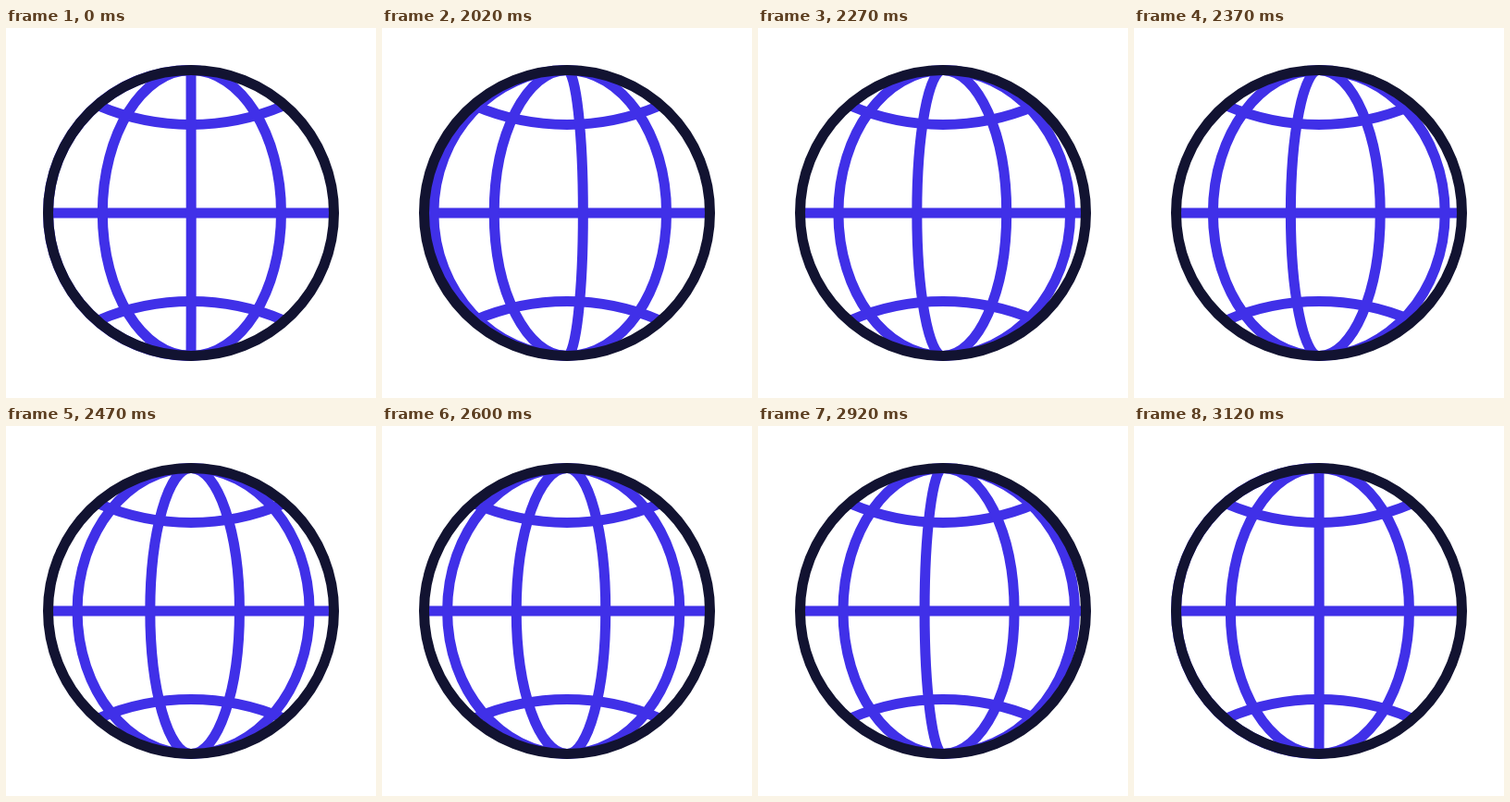
Recreate the animation shown at these times as an HTML page. Size 400x400 px, loop 3.2 s.

```html
<!DOCTYPE html>
<html lang="en">
<head>
<meta charset="utf-8">
<title>Spinning globe</title>
<style>
  html, body { margin: 0; width: 100%; height: 100%; overflow: hidden; background: #fff; }
  svg { display: block; width: 100%; height: 100%; }
</style>
</head>
<body>
<svg viewBox="0 0 400 400" fill="none" stroke-width="11">
  <g stroke="#4030e8">
    <path d="M46 200H354"/>
    <path d="M100 84A255 255 0 0 0 300 84"/>
    <path d="M100 316A255 255 0 0 1 300 316"/>
    <g id="meridians"></g>
  </g>
  <circle cx="200" cy="200" r="154.5" stroke="#121331"/>
</svg>
<script>
  const LOOP = 3200, START = 2000, SPIN = 1120, TURNS = 7;
  const STOPS = [-154.5, -95.7, 0.2, 97.5, 154.5];
  const C = 200, R = 154.5, K = 0.5523;

  const group = document.getElementById('meridians');
  const lines = STOPS.slice(1).map(() =>
    group.appendChild(document.createElementNS('http://www.w3.org/2000/svg', 'path')));

  const bezier = (a, b, u) => 3 * (1 - u) ** 2 * u * a + 3 * (1 - u) * u * u * b + u ** 3;

  // cubic-bezier(.167, .167, .461, 1)
  function ease(x) {
    if (x <= 0 || x >= 1) return x <= 0 ? 0 : 1;
    let lo = 0, hi = 1;
    for (let i = 0; i < 30; i++) {
      const mid = (lo + hi) / 2;
      if (bezier(0.167, 0.461, mid) < x) lo = mid; else hi = mid;
    }
    return bezier(0.167, 1, lo);
  }

  // Half ellipse from pole to pole, bulging sideways by w
  const meridian = w =>
    `M${C} ${C - R}C${C + K * w} ${C - R} ${C + w} ${C - K * R} ${C + w} ${C}` +
    `S${C + K * w} ${C + R} ${C} ${C + R}`;

  // 40 steps per second, lasting 20 and 30 ms in turn
  const step = t => Math.floor(t / 50) * 50 + (t % 50 >= 20 ? 25 : 0);

  function draw(now) {
    const t = step(now % LOOP);
    const phase = TURNS * ease((t - START) / SPIN) % 1;
    lines.forEach((line, i) => {
      const w = STOPS[i] + (STOPS[i + 1] - STOPS[i]) * phase;
      line.setAttribute('d', meridian(w));
    });
  }

  const begin = performance.now();
  function tick() {
    draw(performance.now() - begin);
    requestAnimationFrame(tick);
  }
  tick();
</script>
</body>
</html>
```
